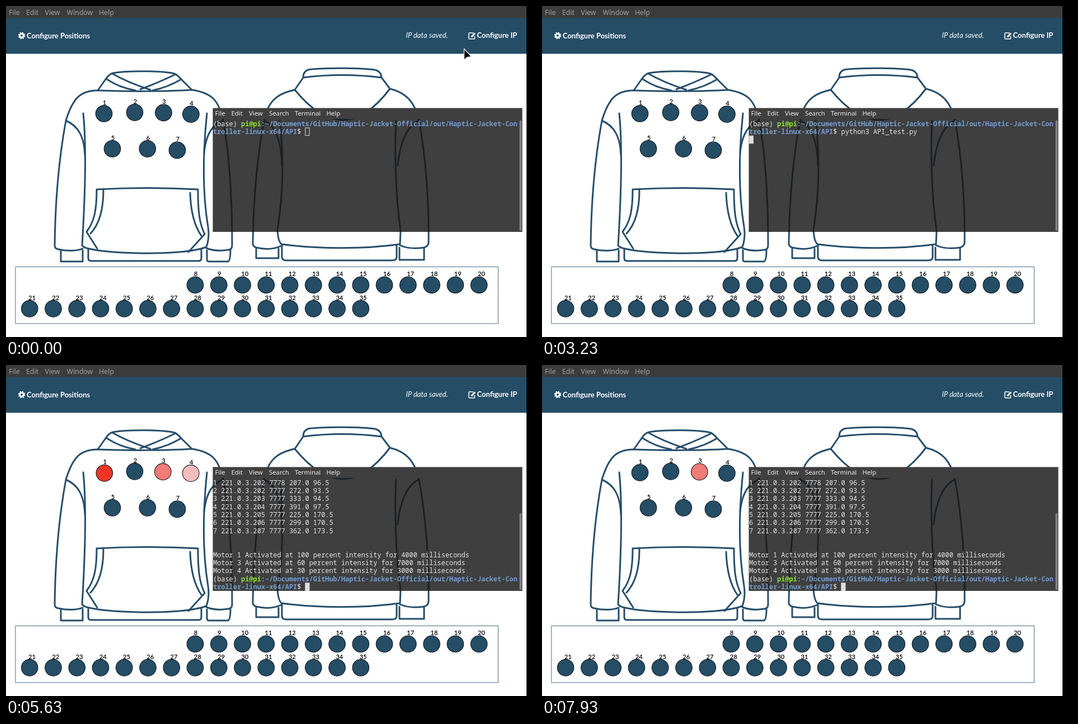
Animation, 947 px wide and 592 px high, one loop 8000 ms. Source, as an HTML page:

```html
<!DOCTYPE html>
<html lang="en">
<head>
<meta charset="utf-8">
<title>Jacket controller</title>
<style>
html, body { margin: 0; width: 100%; height: 100%; overflow: hidden; background: #fff; }
svg { display: block; width: 947px; height: 592px; }
text { white-space: pre; }
.lato { font-family: Lato, sans-serif; font-size: 13px; fill: #fff; }
.bold { font-weight: 700; }
.menu { font-family: "Noto Sans", sans-serif; }
.label { font: 600 11.2px Lato, sans-serif; fill: #000; }
.jacket { fill: none; stroke: #264d6a; stroke-width: 3; stroke-linejoin: round; stroke-linecap: round; }
.mono { font-family: "Noto Sans Mono", monospace; font-size: 11.93px; fill: #e6e6e6; }
.user { fill: #8ae234; font-weight: 700; }
.path { fill: #729fcf; font-weight: 700; }
</style>
</head>
<body>
<svg viewBox="0 0 947 592">
  <rect width="947" height="592" fill="#fff"/>
  <rect width="930" height="22" fill="#3c3c3c"/>
  <rect y="21.5" width="930" height="64" fill="#254d66"/>
  <rect x="930" width="17" height="592" fill="#000"/>
  <g id="appMenu" class="menu" font-size="12.3" fill="#a0a0a0"></g>

  <g fill="none" stroke="#fff">
    <circle cx="28" cy="53" r="3.4" stroke-width="3"/>
    <circle cx="28" cy="53" r="5.2" stroke-width="2.2" stroke-dasharray="2.2 1.884"/>
    <path d="M835 48H828.5Q827 48 827 49.5V57.5Q827 59 828.5 59H836Q837.5 59 837.5 57.5V54" stroke-width="1.6"/>
    <path d="M831.5 55.5L838 48.5" stroke-width="3.2"/>
  </g>
  <text class="lato bold" x="37" y="57.6">Configure Positions</text>
  <text class="lato" x="714.5" y="57.4" font-style="italic">IP data saved.</text>
  <text class="lato bold" x="841.5" y="57.4">Configure IP</text>

  <g class="jacket">
    <!-- front: hood -->
    <path d="M164 151L178 131Q184 122 191 120C220 115 280 116 301 121Q306 123 314 132L332 150"/>
    <path d="M164 151C210 153 290 153 332 150M190 121Q218 137 258 150M180 131Q203 146 231 151M303 122Q275 136 240 149M313 131Q290 145 262 151"/>
    <!-- front: sleeves -->
    <path d="M164 151C132 151 119 166 107 205C95 270 88 350 87 428Q87 434 93 435C110 439 128 438 137 434M107 205C128 214 140 232 141 268M98 437V457H137V437"/>
    <path d="M332 150C365 155 380 166 388 205C400 270 404 340 404 428Q404 435 398 436Q375 440 358 433M388 205C370 212 358 226 354 262M359 437V453Q359 457 363 457H396Q401 457 401 437"/>
    <!-- front: body and pocket -->
    <path d="M138 192C144 250 142 330 136 428Q138 432 148 434C165 438 195 441 235 442C285 443 335 440 358 431C362 420 363 408 361 395C351 335 352 260 359 192"/>
    <path d="M147 434V451Q147 456 152 456H344Q349 456 349 451V435"/>
    <path d="M162 328Q252 323 343 328C343 365 345 388 355 408L326 440M162 328C162 365 158 385 144 404L163 434M174 330C174 365 167 390 151 407M329 334C330 368 336 392 349 411"/>
    <!-- back: collar -->
    <path d="M516 150L531 128Q531 113 548 113C580 110 635 111 658 114Q670 116 671 128L686 148M531 128Q600 119 671 128M516 150C575 222 630 222 686 148"/>
    <!-- back: sleeves -->
    <path d="M516 150C482 157 468 172 461 205C449 270 442 350 441 425Q441 430 447 432Q472 438 492 429M461 205C480 212 492 240 493 285M447 434V451H487V434"/>
    <path d="M686 148C714 155 730 170 738 205C750 270 756 350 755 424Q754 430 747 432Q722 436 704 428M738 205C720 212 704 240 700 285M703 432V454H747V432"/>
    <!-- back: body -->
    <path d="M489 205C497 270 495 340 485 400Q486 420 492 426C560 435 640 435 704 426L705 402C696 340 694 260 697 205M493 428V448Q493 455 500 455H690Q698 455 698 449V429"/>
  </g>
  <rect x="16.9" y="466.5" width="862.5" height="101.5" fill="none" stroke="#4d6c80"/>
  <g id="motors"></g>

  <g>
    <rect x="369.5" y="182.5" width="553" height="19.5" fill="#3f3f3f"/>
    <rect x="369.5" y="202" width="553" height="202" fill="#191919" fill-opacity=".83"/>
    <g id="termMenu" class="menu" font-size="11.3" fill="#eee"></g>
    <rect id="thumb" x="917.5" width="3.5" rx="1.5" fill="#858585"/>
    <g id="screen" class="mono"></g>
    <rect id="cursor" width="7.2" height="13.5" stroke="#ddd"/>
  </g>
  <path id="pointer" d="M0 0V20L5.5 15.2L13 14Z" fill="#000" stroke="#fff" stroke-width="1.2" stroke-linejoin="round"/>
</svg>
<script>
const LOOP = 8000, FOCUS = 630, RECALL = 1600, RECALL_AGAIN = 2230, ENTER = 3000, START = 3430;
const BLINK = 600, CHAR = 7.158, LINE = 14.33;
const $ = id => document.getElementById(id);

function make(parent, tag, attrs, text = "") {
  const el = document.createElementNS("http://www.w3.org/2000/svg", tag);
  for (const key in attrs) el.setAttribute(key, attrs[key]);
  el.textContent = text;
  return parent.appendChild(el);
}

function menu(parent, y, words, xs) {
  words.split(" ").forEach((word, i) => make(parent, "text", { x: xs[i], y }, word));
}
menu($("appMenu"), 15.5, "File Edit View Window Help", [5, 36, 69.5, 108.5, 166]);
menu($("termMenu"), 195.5, "File Edit View Search Terminal Help", [373.5, 402.5, 434, 470, 516, 572.5]);

const front = [[175, 192.5], [230, 190.3], [281.5, 190.8], [330.4, 193.5], [190, 255.3], [252.8, 255.3], [306, 257.8]];
const motors = [];
for (let n = 1; n <= 35; n++) {
  const slot = n < 21 ? n - 1 : n - 21;
  const [x, y] = front[n - 1] || [42.2 + 42.26 * slot, n < 21 ? 499 : 541.3];
  const group = make($("motors"), "g", {});
  const disc = make(group, "circle", { cx: x, cy: y, r: 14.8, stroke: "#10161c", "stroke-width": 1.1 });
  make(group, "text", { class: "label", x: x - 2.2, y: y - 15.8 }, n);
  motors.push({ group, disc });
}

// motor number, running time, shake in px, colour
const runs = [[1, 4000, 3, "#ee3528"], [3, 7000, 1.2, "#f07b77"], [4, 3000, 1, "#f5bdbc"]];

const prompt = [
  '(base) <tspan class="user">pi@pi</tspan>:<tspan class="path">~/Documents/GitHub/Haptic-Jacket-Official/out/Haptic-Jacket-Con</tspan>',
  '<tspan class="path">troller-linux-x64/API</tspan>$ '
];
const output = [
  "1 221.0.3.202 7778 207.0 96.5",
  "2 221.0.3.202 7777 272.0 93.5",
  "3 221.0.3.203 7777 333.0 94.5",
  "4 221.0.3.204 7777 391.0 97.5",
  "5 221.0.3.205 7777 225.0 170.5",
  "6 221.0.3.206 7777 299.0 170.5",
  "7 221.0.3.207 7777 362.0 173.5",
  "", "",
  "Motor 1 Activated at 100 percent intensity for 4000 milliseconds",
  "Motor 3 Activated at 60 percent intensity for 7000 milliseconds",
  "Motor 4 Activated at 30 percent intensity for 3000 milliseconds"
];
const rows = Array.from({ length: 14 }, (_, i) => make($("screen"), "text", { x: 370, y: 214.6 + LINE * i }));

function set(el, attrs) {
  for (const key in attrs) el.setAttribute(key, attrs[key]);
}

function noise(a, b) {
  const v = Math.sin(a * 12.9898 + b * 78.233) * 43758.5453;
  return (v - Math.floor(v)) * 2 - 1;
}

function ease(t, from, to) {
  const p = Math.min(1, Math.max(0, (t - from) / (to - from)));
  return p * p * (3 - 2 * p);
}

let shown = "";
function drawTerminal(t) {
  const done = t >= START;
  const typed = t < RECALL ? "" : t < RECALL_AGAIN ? "clear" : "python3 API_test.py";
  const lines = done ? output.concat(prompt) : [prompt[0], prompt[1] + typed];
  const content = lines.join("\n");
  if (content !== shown) {
    rows.forEach((row, i) => { row.innerHTML = lines[i] || ""; });
    shown = content;
  }
  set($("thumb"), done ? { y: 265, height: 137 } : { y: 204.5, height: 197.5 });

  const running = t >= ENTER && !done;
  const col = running ? 0 : 23 + (done ? 0 : typed.length);
  const row = done ? 13 : running ? 2 : 1;
  const lastKey = [ENTER, RECALL_AGAIN, RECALL, FOCUS].find(k => t >= k);
  const focused = lastKey !== undefined;
  const lit = !focused || Math.floor((t - lastKey + 30) / BLINK) % 2 === 0;
  set($("cursor"), {
    x: 370.2 + CHAR * col, y: 203.6 + LINE * row,
    fill: focused ? "#ddd" : "none", visibility: lit ? "visible" : "hidden"
  });
}

function draw(t) {
  const tick = Math.floor(t / 100) * 2 + (t % 100 >= 30 ? 1 : 0);
  const now = Math.floor(tick / 2) * 100 + (tick % 2) * 30;
  motors.forEach(m => set(m.disc, { fill: "#254d66" }));
  for (const [n, span, shake, color] of runs) {
    const { group, disc } = motors[n - 1];
    const on = now >= START && now < START + span;
    const dx = on ? shake * noise(tick, n) : 0;
    const dy = on ? shake * 0.7 * noise(tick, n + 9) : 0;
    set(group, { transform: `translate(${dx} ${dy})` });
    if (on) set(disc, { fill: color });
  }
  drawTerminal(now);

  const reach = ease(now, 0, 400), settle = ease(now, 600, 900);
  set($("pointer"), {
    transform: `translate(${818.5 - 48 * reach - 18 * settle} ${76.5 + 175 * reach + 45 * settle})`,
    visibility: now < RECALL ? "visible" : "hidden"
  });
}

const began = performance.now();
function frame() {
  draw((performance.now() - began) % LOOP);
  requestAnimationFrame(frame);
}
frame();
</script>
</body>
</html>
```
